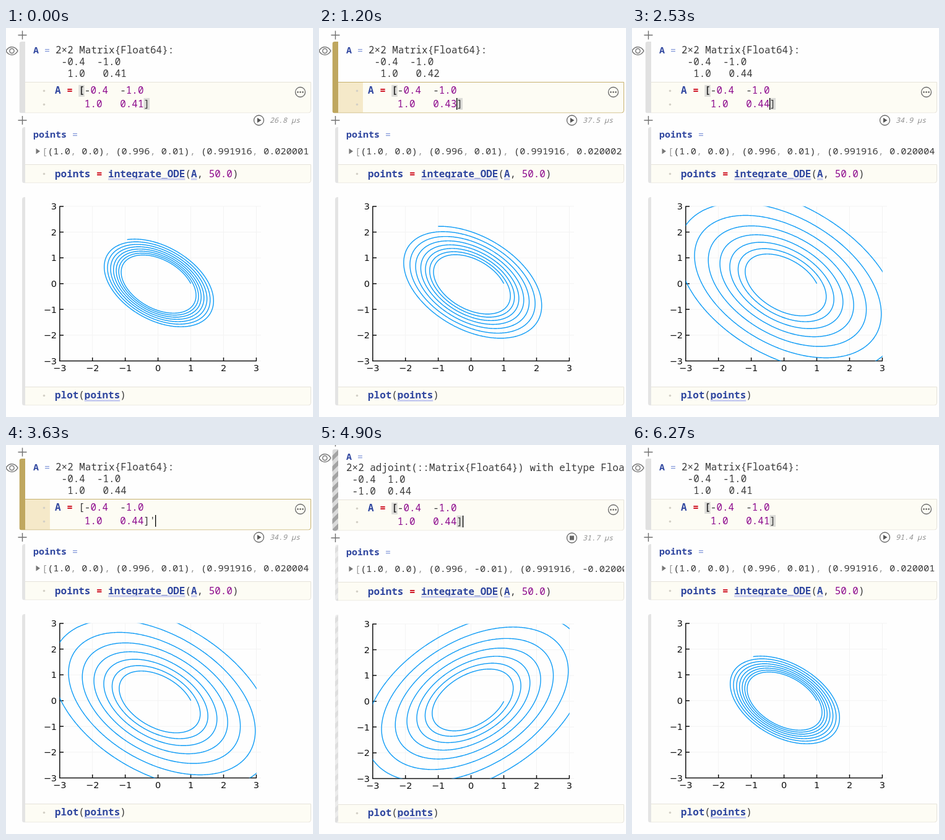
Recreate the animation shown at these times as an HTML page with a canvas. Size 496 by 628 pixels, loop 6330 ms.

```html
<!DOCTYPE html>
<html lang="en">
<head>
<meta charset="utf-8">
<title>Reactive notebook</title>
<style>
html, body { margin: 0; width: 100%; height: 100%; overflow: hidden; background: #fefefe; }
canvas { display: block; }
</style>
</head>
<body>
<canvas id="stage" width="496" height="628"></canvas>
<script>
const ctx = document.getElementById('stage').getContext('2d');
const LOOP = 6330;
const MONO = '"Noto Sans Mono", "DejaVu Sans Mono", monospace';
const CODE = 15.95, LABEL = 15, LIST = 15.3;
const BLUE = '#2f469f', INK = '#3a3a3a', RED = '#cf1322', PURPLE = '#8d0a8d';
const GREY = '#9b9b9b', GOLD = '#bfa75f', PAPER = '#fdfcf4', EDGE = '#e6e3da';

// Each step overrides part of the state: [time, changes]
const steps = [
  [0, { num: '0.41', tail: '', value: 0.41, adj: false, caret: null, mode: 'idle', took: '26.8' }],
  [300, { num: '0.4', caret: 'in', mode: 'edit' }],
  [370, { num: '0.42' }],
  [630, { mode: 'run' }],
  [730, { value: 0.42, mode: 'idle', took: '37.5' }],
  [1130, { num: '0.4', mode: 'edit' }],
  [1200, { num: '0.43' }],
  [1400, { mode: 'run' }],
  [1500, { value: 0.43, mode: 'idle', took: '30.2' }],
  [2030, { num: '0.4', mode: 'edit' }],
  [2100, { num: '0.44' }],
  [2430, { mode: 'run' }],
  [2530, { value: 0.44, mode: 'idle', took: '34.9' }],
  [2900, { caret: null }],
  [2970, { caret: 'end' }],
  [3570, { tail: "'", mode: 'edit' }],
  [3830, { mode: 'run' }],
  [3930, { adj: true, mode: 'idle', took: '31.7' }],
  [4370, { tail: '', mode: 'edit' }],
  [4770, { mode: 'run' }],
  [4960, { adj: false, mode: 'idle', took: '18.2', caret: null }],
  [5300, { caret: 'in' }],
  [5500, { num: '0.4', mode: 'edit' }],
  [5690, { num: '0.41' }],
  [6000, { mode: 'run' }],
  [6100, { value: 0.41, mode: 'idle', took: '91.4' }],
  [6200, { caret: null }]
];

function stateAt(t) {
  const s = {};
  for (const [at, change] of steps) if (at <= t) Object.assign(s, change);
  return s;
}

const px = x => 245.6 + x * 52.95;
const py = y => 412.7 - y * 41.6;

// Euler integration of u' = A u
const curves = {};
function curve(value, adj) {
  const key = value + (adj ? 't' : '');
  if (curves[key]) return curves[key];
  const path = new Path2D(), b = adj ? 1 : -1, dt = 0.01;
  let x = 1, y = 0;
  path.moveTo(px(x), py(y));
  for (let i = 0; i < 5000; i++) {
    [x, y] = [x + dt * (-0.4 * x + b * y), y + dt * (-b * x + value * y)];
    path.lineTo(px(x), py(y));
  }
  return curves[key] = path;
}

function text(str, x, y, color, size = CODE, style = '500') {
  ctx.font = `${style} ${size}px ${MONO}`;
  ctx.fillStyle = color;
  ctx.fillText(str, x, y);
  return x + ctx.measureText(str).width;
}

// Parts: [string, color, style, underlined]
function line(parts, x, y, size = CODE) {
  for (const [str, color, style = '500', under] of parts) {
    const end = text(str, x, y, color, size, style);
    if (under) rect(x, y + 2, end - x, 3, '#cbcff0');
    x = end;
  }
}

function rect(x, y, w, h, color) {
  ctx.fillStyle = color;
  ctx.fillRect(x, y, w, h);
}

function stroke(color, width, draw) {
  ctx.strokeStyle = color;
  ctx.lineWidth = width;
  ctx.beginPath();
  draw();
  ctx.stroke();
}

function disc(x, y, r, color) {
  ctx.fillStyle = color;
  ctx.beginPath();
  ctx.arc(x, y, r, 0, 7);
  ctx.fill();
}

const ring = (x, y, r, width = 1.3) => stroke('#666', width, () => ctx.arc(x, y, r, 0, 7));

function plus(x, y) {
  stroke('#707070', 1.4, () => {
    ctx.moveTo(x - 7, y); ctx.lineTo(x + 7, y);
    ctx.moveTo(x, y - 7); ctx.lineTo(x, y + 7);
  });
}

function eye(x, y) {
  stroke('#666', 1.3, () => {
    ctx.moveTo(x - 9.5, y);
    ctx.bezierCurveTo(x - 5, y - 8.5, x + 5, y - 8.5, x + 9.5, y);
    ctx.bezierCurveTo(x + 5, y + 8.5, x - 5, y + 8.5, x - 9.5, y);
  });
  ring(x, y, 3.6);
}

function handle(x, top, bottom, color, stripe, t) {
  ctx.save();
  ctx.beginPath();
  ctx.roundRect(x, top, 31 - x, bottom - top, [4, 0, 0, 4]);
  ctx.clip();
  rect(x, top, 10, bottom - top, color);
  if (stripe) stroke(stripe, 6, () => {
    for (let y = top - 20 + (t * 0.02) % 17; y < bottom + 20; y += 17) {
      ctx.moveTo(18, y + 8);
      ctx.lineTo(36, y - 10);
    }
  });
  ctx.restore();
}

function codeBox(top, bottom, edit) {
  const shape = () => ctx.roundRect(29.5, top + 0.5, 463, bottom - top - 1, [0, 0, 4, 0]);
  ctx.save();
  ctx.beginPath();
  ctx.rect(31, top, 465, bottom - top);
  ctx.clip();
  ctx.fillStyle = PAPER;
  ctx.beginPath();
  shape();
  ctx.fill();
  if (edit) rect(31, top + 1, 40, bottom - top - 2, '#f5e9c9');
  stroke(edit ? '#c5b06e' : EDGE, 1, shape);
  ctx.restore();
}

const bullet = y => disc(61.5, y, 1.8, '#d3d0c6');

function output(s) {
  const v = s.value.toFixed(2);
  const label = [['A', BLUE, '700'], [' =', '#7d93d8', '500']];
  if (s.adj) {
    line(label, 44, 24, LABEL);
    ['2×2 adjoint(::Matrix{Float64}) with eltype Float64:', ' -0.4  1.0', ' -1.0  ' + v]
      .forEach((row, i) => text(row, 44, 42.3 + i * 19, INK, CODE, '400'));
  } else {
    line(label, 44, 41, LABEL);
    ['2×2 Matrix{Float64}:', ' -0.4  -1.0', '  1.0   ' + v]
      .forEach((row, i) => text(row, 80, 41 + i * 19.1, INK, CODE, '400'));
  }
}

function matrixCode(s) {
  const w = CODE * 0.6, close = 79 + (11 + s.num.length) * w;
  if (!s.tail) {
    rect(79 + 4 * w, 92, w, 19, '#dcdcd8');
    rect(close, 113, w, 19, '#dcdcd8');
  }
  line([['A', BLUE, '700'], [' = ', RED, '700'], ['[', INK, s.tail ? '500' : '700'],
    ['-', INK], ['0.4', PURPLE], ['  -', INK], ['1.0', PURPLE]], 79, 106);
  line([['     1.0   ' + s.num, PURPLE], [']' + s.tail, INK]], 79, 128);
  if (s.caret) {
    const x = s.caret === 'in' ? close : close + w * (1 + s.tail.length);
    rect(Math.floor(x), 113, 1.3, 19, '#000');
  }
}

function timing(s) {
  ring(408.5, 149, 8);
  if (s.mode === 'run') rect(405, 145.5, 7, 7, '#666');
  else {
    ctx.fillStyle = '#555';
    ctx.beginPath();
    ctx.moveTo(406, 145);
    ctx.lineTo(412.5, 149);
    ctx.lineTo(406, 153);
    ctx.fill();
  }
  text(s.took + ' µs', 426, 153, '#8f8f8f', 11.7, 'italic 500');
}

function pointsCell(s) {
  line([['points', BLUE, '700'], [' =', '#7d93d8']], 44, 177, LABEL);
  ctx.fillStyle = '#777';
  ctx.beginPath();
  ctx.moveTo(48.5, 194.5);
  ctx.lineTo(55, 199);
  ctx.lineTo(48.5, 203.5);
  ctx.fill();
  const sign = s.adj ? '-' : '';
  const last = '0.02000' + (Math.round(s.value * 100) - 40);
  const list = `[(1.0, 0.0), (0.996, ${sign}0.01), (0.991916, ${sign}${last}`;
  const parts = list.split(/([\[,]\s?)/).filter(Boolean)
    .map(p => [p, /^[\[,]/.test(p) ? GREY : INK, '400']);
  ctx.save();
  ctx.beginPath();
  ctx.rect(0, 180, 493, 35);
  ctx.clip();
  line(parts, 58, 204, LIST);
  ctx.restore();
  codeBox(220, 250.5);
  bullet(235.5);
  line([['points', BLUE, '700'], [' = ', RED, '700'], ['integrate_ODE', BLUE, '700', true], ['(', INK],
    ['A', BLUE, '700', true], [', ', INK], ['50.0', PURPLE], [')', INK]], 79, 240.5);
}

function plotCell(s) {
  stroke('#f3f3f3', 1, () => {
    for (let i = -3; i <= 3; i++) {
      ctx.moveTo(px(i), 288); ctx.lineTo(px(i), 537);
      ctx.moveTo(87, py(i)); ctx.lineTo(412, py(i));
    }
  });
  stroke('#111', 1.5, () => {
    ctx.moveTo(86.8, 287.6);
    ctx.lineTo(86.8, 537.5);
    ctx.lineTo(404.8, 537.5);
    for (let i = -3; i <= 3; i++) {
      ctx.moveTo(px(i), 537.5); ctx.lineTo(px(i), 532);
      ctx.moveTo(87, py(i)); ctx.lineTo(93, py(i));
    }
  });
  ctx.font = '14.5px "DejaVu Sans", sans-serif';
  ctx.fillStyle = '#111';
  for (let i = -3; i <= 3; i++) {
    const name = String(i).replace('-', '−');
    ctx.textAlign = 'right';
    ctx.fillText(name, 82, py(i) + 5.3);
    ctx.textAlign = 'center';
    ctx.fillText(name, px(i), 553.5);
  }
  ctx.textAlign = 'left';

  ctx.save();
  ctx.beginPath();
  ctx.rect(86.8, 287.8, 318, 249.8);
  ctx.clip();
  ctx.strokeStyle = '#109cf6';
  ctx.lineWidth = 1.4;
  ctx.lineJoin = 'round';
  ctx.stroke(curve(s.value, s.adj));
  ctx.restore();

  codeBox(579, 609.5);
  bullet(593.5);
  line([['plot', BLUE, '700'], ['(', INK], ['points', BLUE, '700', true], [')', INK]], 79, 598);
}

function scrollbar(t) {
  for (const [shown, top] of [[3930, 75], [4960, 71]]) {
    const fade = Math.min(1, Math.max(0, (t - shown - 540) / 270));
    if (t < shown || fade === 1 || (top === 75 && t >= 4960)) continue;
    ctx.globalAlpha = (1 - fade) ** 2.5;
    ctx.fillStyle = '#7c7c7c';
    ctx.beginPath();
    ctx.roundRect(491, top, 6, 356, 2);
    ctx.fill();
    ctx.globalAlpha = 1;
  }
}

function draw(t) {
  const s = stateAt(t), edit = s.mode === 'edit', run = s.mode === 'run';
  const lift = s.adj ? -16 : 0;
  rect(0, 0, 496, 628, '#fefefe');
  plus(26.5, 11.5 + lift);
  eye(9.5, 37 + lift);
  ctx.save();
  ctx.beginPath();
  ctx.rect(0, 0, 494, 628);
  ctx.clip();
  output(s);
  ctx.translate(0, s.adj ? 1 : 0);
  handle(21.5, 22 + lift, 137.5, edit ? GOLD : run ? '#dadada' : '#e1e1e1', run && '#a3a3a3', t);
  codeBox(87, 137.5, edit);
  bullet(101.5);
  bullet(123.5);
  matrixCode(s);
  ring(475.5, 103.5, 8);
  for (const dx of [-4, 0, 4]) disc(475.5 + dx, 103.5, 1.2, '#555');
  plus(26.5, 149);
  timing(s);
  for (const [top, bottom] of [[160, 250.5], [273, 609.5]])
    handle(26, top, bottom, run ? '#ebebeb' : '#e4e4e4', run && '#dedede', t);
  pointsCell(s);
  plotCell(s);
  ctx.restore();
  scrollbar(t);
}

function frame() {
  draw(performance.now() % LOOP);
  requestAnimationFrame(frame);
}
frame();
</script>
</body>
</html>
```
